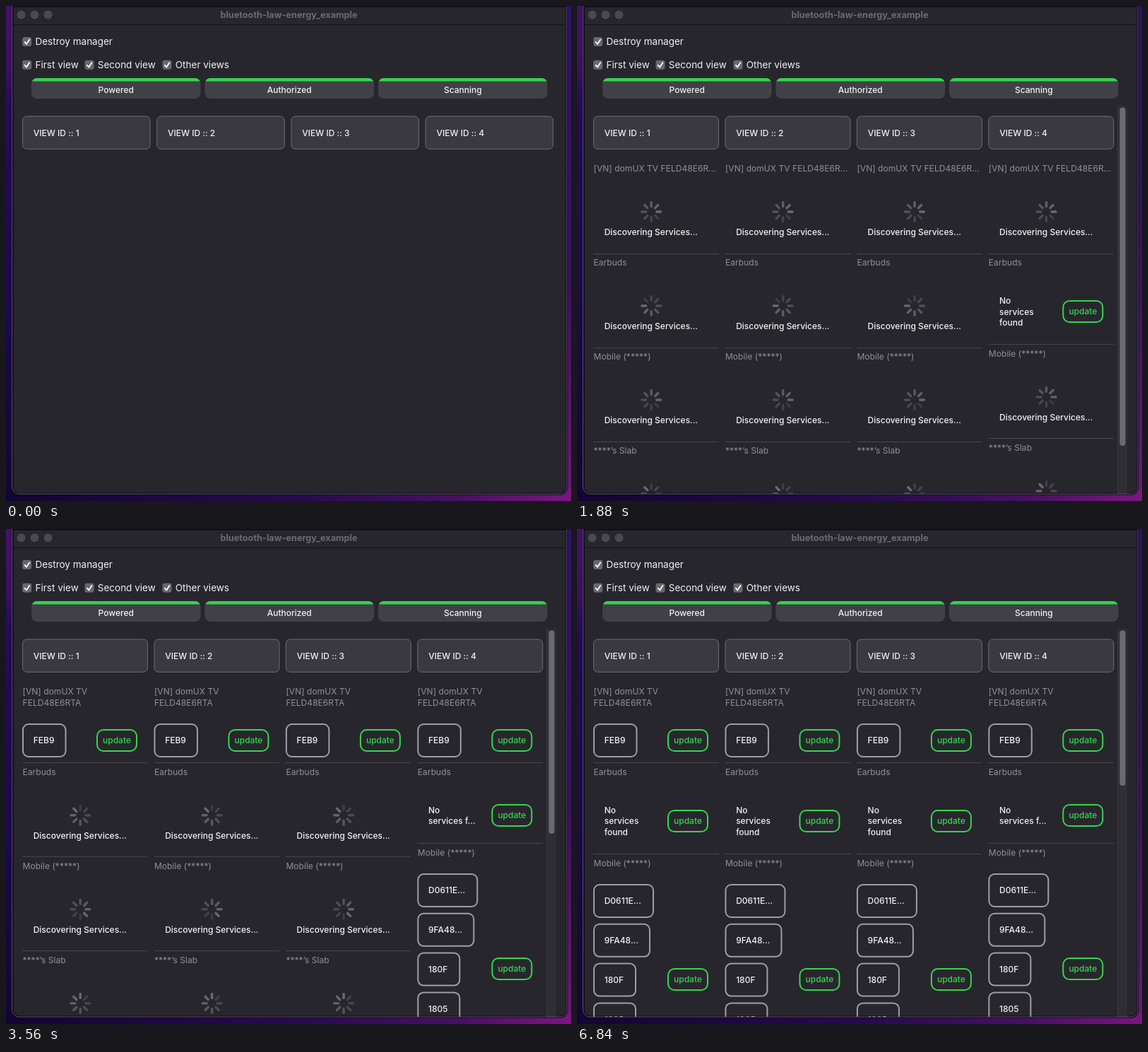
An HTML page that plays this animation: 800 by 700 pixels, repeating every 6.92 s.

```html
<!DOCTYPE html>
<html lang="en">
<head>
<meta charset="utf-8">
<title>Device scanner</title>
<style>
  html, body { margin: 0; width: 100%; height: 100%; overflow: hidden; background: #1b0a45; }
  svg { display: block; width: 800px; height: 700px; }
  text { font: 500 12px Inter, "Liberation Sans", sans-serif; fill: #f1f0f3; }
  .title { font-size: 12.7px; font-weight: 700; fill: #6c6971; }
  .check { font-size: 13.5px; font-weight: 400; }
  .name { font-weight: 400; fill: #918f95; letter-spacing: .05px; }
  .update { fill: #32d74b; }
  .card { fill: #3b3940; stroke: #6d6b72; }
  .service { fill: none; stroke: #a09ea4; stroke-width: 2; }
  .button { fill: none; stroke: #32d74b; stroke-width: 2; }
  .line { stroke: #47454c; }
  .spoke { stroke: #a5a3a9; stroke-width: 3.4; stroke-linecap: round; }
</style>
</head>
<body>
<svg viewBox="0 0 800 700">
  <defs>
    <linearGradient id="left" x2="0" y2="1">
      <stop offset="0" stop-color="#45116a"/><stop offset=".13" stop-color="#3d0f65"/>
      <stop offset=".2" stop-color="#260a5c"/><stop offset=".6" stop-color="#1c0952"/>
      <stop offset="1" stop-color="#130533"/>
    </linearGradient>
    <linearGradient id="right" x2="0" y2="1">
      <stop offset="0" stop-color="#2f1070"/><stop offset=".55" stop-color="#3d0f69"/>
      <stop offset="1" stop-color="#75157d"/>
    </linearGradient>
    <linearGradient id="bottom">
      <stop offset="0" stop-color="#130533"/><stop offset=".5" stop-color="#260a4c"/>
      <stop offset=".8" stop-color="#481062"/><stop offset="1" stop-color="#7b1680"/>
    </linearGradient>
    <clipPath id="window"><path d="M9 0H794V680a10 10 0 0 1-10 10H19a10 10 0 0 1-10-10Z"/></clipPath>
  </defs>
  <rect width="400" height="700" fill="url(#left)"/>
  <rect x="400" width="400" height="700" fill="url(#right)"/>
  <rect y="684" width="800" height="16" fill="url(#bottom)"/>
  <path d="M9 0H794V680a10 10 0 0 1-10 10H19a10 10 0 0 1-10-10Z" fill="#28262d" stroke="#0d0718" stroke-width="3"/>
  <path d="M9 26.5H794" stroke="#131217"/>
  <g id="chrome"></g>
  <g id="list" clip-path="url(#window)"></g>
  <path d="M8.5 0V680a10 10 0 0 0 10 10H784a10 10 0 0 0 10-10V0" fill="none" stroke="#5d5a62"/>
</svg>
<script>
const LOOP = 6920, TICK = 40, SPIN = 800, LEAD = 15.3;
const NAMES = ['[VN] domUX TV FELD48E6RTA', 'Earbuds', 'Mobile (*****)', '****’s Slab'];
const NAME_WRAP = ['[VN] domUX TV', 'FELD48E6RTA'];
const NAME_CUT = '[VN] domUX TV FELD48E6R...';
const EMPTY = {
  2: ['No services', 'found'],
  3: ['No', 'services', 'found'],
  t: ['No', 'services f...']
};
const SERVICES = {
  B: [['FEB9', 62]],
  m: [['D0611E...', 85.5], ['9FA48...', 80.5], ['180F', 60.5], ['1805', 60.5]]
};

// time, rows of views 1-3, rows of view 4, bottom of the scroll thumb
// s/S waiting, B/m services, 2/3/t no services; a capital wraps the name
const STAGES = [
  [0, '', ''],
  [80, 's', 's'],
  [200, 'ss', 'ss'],
  [320, 'sss', 'sss'],
  [440, 'sss', 's2s'],
  [1200, 'ssss', 's3ss', 622],
  [2160, 'Ssss', 's3m', 421],
  [2920, 'Ssss', 'Btm', 431],
  [3080, 'Bsss', 'Btm', 431],
  [3800, 'B3ss', 'Btm', 425],
  [4120, 'B3m', 'B3m', 362],
  [5480, 'B3m', 'Btm', 363]
];

const text = (x, mid, str, cls = '', anchor = 'start') =>
  `<text x="${x}" y="${mid + 4.3}" class="${cls}" text-anchor="${anchor}">${str}</text>`;
const box = (x, y, w, h, r, attrs) =>
  `<rect x="${x}" y="${y}" width="${w}" height="${h}" rx="${r}" ${attrs}/>`;

function checkbox(x, mid, label) {
  return box(x, mid - 6.5, 13, 13, 3, 'fill="#69676d"') +
    `<path d="M${x + 3.3} ${mid + .4}l2.5 2.9 4.2-6.4" fill="none" stroke="#fff" stroke-width="1.8" stroke-linecap="round" stroke-linejoin="round"/>` +
    text(x + 18.3, mid + .5, label, 'check');
}

function statusBar(x, label) {
  const r = 8, w = 239.5;
  return box(x, 102, w, 29, r, 'fill="#414047"') +
    `<path d="M${x + .8} 106.5a8 8 0 0 1 7.2-4.5h${w - 16}a8 8 0 0 1 7.2 4.5z" fill="#34d44d"/>` +
    text(x + w / 2, 118.8, label, '', 'middle');
}

function chrome() {
  const lights = [21.5, 40.5, 59.5].map(x => `<circle cx="${x}" cy="12.5" r="6" fill="#4b494f"/>`);
  return lights.join('') +
    text(400.5, 12.3, 'bluetooth-law-energy_example', 'title', 'middle') +
    checkbox(23.2, 50.5, 'Destroy manager') +
    checkbox(23.2, 83.2, 'First view') +
    checkbox(111.5, 83.2, 'Second view') +
    checkbox(221.5, 83.2, 'Other views') +
    statusBar(36, 'Powered') + statusBar(281.5, 'Authorized') + statusBar(527, 'Scanning');
}

function updateButton(right, middle) {
  const mid = Math.floor(middle);
  return box(right - 71.5, mid - 15, 56, 30, 9, 'class="button"') +
    text(right - 43.5, mid, 'update', 'update', 'middle');
}

function spinner(x, y, row) {
  let out = `<g transform="translate(${x} ${y})">`;
  for (let i = 0; i < 8; i++)
    out += `<path class="spoke" data-turn="${i / 8 + .1 - row * .55}" d="M0-7.6V-13.4" transform="rotate(${i * 45})"/>`;
  return out + '</g>';
}

// Body of one device, measured from the middle of its last name line
function body(kind, x, w, y, row) {
  if (kind in EMPTY) {
    const lines = EMPTY[kind], n = lines.length;
    return [
      lines.map((s, i) => text(x + 15.2, y + 54 + i * LEAD, s)).join('') +
        updateButton(x + w, y + 54 + (n - 1) * LEAD / 2),
      83 + n * LEAD
    ];
  }
  if (kind in SERVICES) {
    const first = Math.floor(y + 30);
    const buttons = SERVICES[kind].map(([s, bw], i) => {
      const top = first + i * 55.8;
      return box(x + .5, top + 1, bw - 1.5, 46, 8, 'class="service"') + text(x + 15.2, top + 24, s);
    });
    const long = kind === 'm';
    return [buttons.join('') + updateButton(x + w, first + (long ? 135 : 24)), long ? 377 : 98.5];
  }
  return [spinner(x + 81.7, y + 61, row) + text(x + 15.2, y + 89.6, 'Discovering Services...'), 133];
}

function column(view, kinds, narrow) {
  const w = narrow ? 177 : 180.6;
  const x = 23.5 + view * (narrow ? 186.45 : 190.2);
  let out = box(x, 156, w, 46.3, 6, 'class="card"') + text(x + 15.3, 179.5, `VIEW ID :: ${view + 1}`);
  let y = 230;
  [...kinds].forEach((kind, row) => {
    const wraps = /[SB]/.test(kind);
    const lines = wraps ? NAME_WRAP : [row === 0 && narrow ? NAME_CUT : NAMES[row]];
    lines.forEach((s, i) => out += text(x, y + i * LEAD, s, 'name'));
    if (wraps) y += LEAD;
    const [shape, height] = body(kind, x, w, y, row);
    y += height;
    out += shape + `<path class="line" d="M${x} ${Math.floor(y - 13) + .5}h${w}"/>`;
  });
  return out;
}

function scrollbar(bottom) {
  return '<path d="M765 141h14v549h-14z" fill="#302e35"/><path d="M765.5 141v549" stroke="#39373e"/>' +
    box(768.5, 143.5, 8, bottom - 143.5, 4, 'fill="#6c6a70"');
}

const list = document.getElementById('list');
document.getElementById('chrome').innerHTML = chrome();
const start = performance.now();
let shown = null, spokes = [];

function draw() {
  const elapsed = (performance.now() - start) % LOOP;
  const time = Math.floor(elapsed / TICK) * TICK;
  const stage = STAGES.findLast(s => s[0] <= time);
  if (stage !== shown) {
    shown = stage;
    const [, rest, last, thumb] = stage;
    list.innerHTML = [rest, rest, rest, last].map((kinds, i) => column(i, kinds, !!thumb)).join('') +
      (thumb ? scrollbar(thumb) : '');
    spokes = list.querySelectorAll('.spoke');
  }
  for (const spoke of spokes) {
    const age = (((time / SPIN - spoke.dataset.turn) % 1) + 1) % 1;
    spoke.setAttribute('stroke-opacity', .15 + .4 * (1 - age));
  }
  requestAnimationFrame(draw);
}
draw();
</script>
</body>
</html>
```
